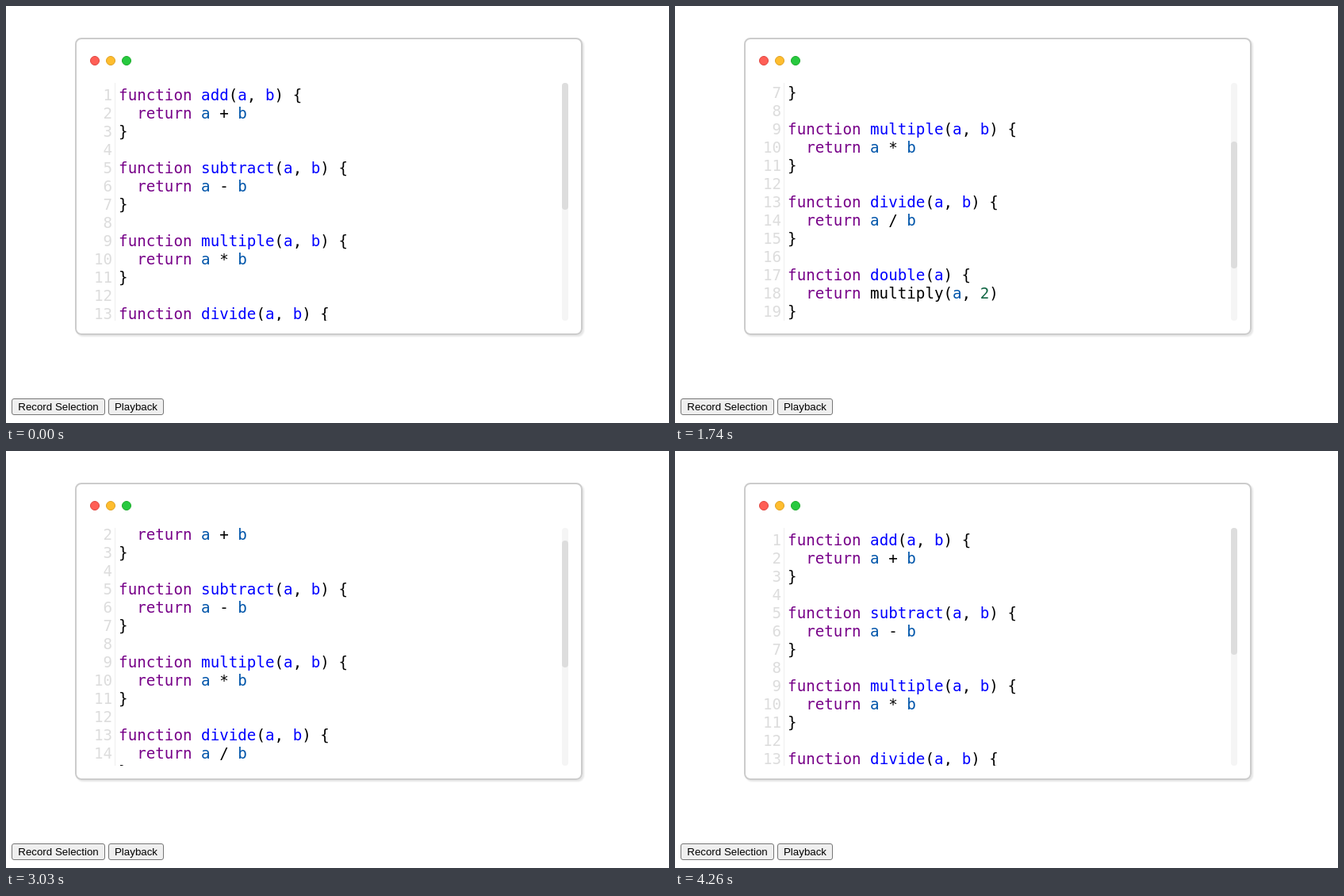
An HTML page for the animation above (4.92 s loop, 836 px wide and 526 px high).

```html
<!DOCTYPE html>
<html lang="en">
<head>
<meta charset="utf-8">
<title>Scroll playback</title>
<style>
  html, body { margin: 0; width: 100%; height: 100%; overflow: hidden; background: #fff; }
  div, button, svg { position: absolute; box-sizing: border-box; }
  .window {
    left: 87px; top: 40px; width: 640px; height: 375px;
    border: 2px solid #ccc; border-radius: 8px; box-shadow: 2px 2px 2px rgba(0, 0, 0, .1);
  }
  .dot { top: 63px; width: 12px; height: 12px; border: 1px solid; border-radius: 50%; }
  .view { left: 106px; top: 97px; width: 595px; height: 300px; overflow: hidden; }
  .gutter { left: 31px; top: 0; width: 1px; height: 300px; background: #eee; }
  #code {
    left: 0; top: 4px; width: 595px;
    font: 19.2px/23px "DejaVu Sans Mono", monospace; white-space: pre;
  }
  #code div { left: 36.1px; height: 23px; }
  #code .num { left: 0; width: 28.1px; text-align: right; color: #ddd; }
  .keyword { color: #708; }
  .def { color: #00f; }
  .local { color: #05a; }
  .number { color: #164; }
  .track { left: 701px; top: 97px; width: 8px; height: 300px; border-radius: 4px; background: #f5f5f5; }
  #thumb { width: 8px; height: 160px; border-radius: 4px; background: #ddd; }
  button {
    top: 495px; height: 21px; padding: 0; border: 1px solid #767676; border-radius: 3px;
    background: #efefef; color: #000; font: 13.333px/19px "Liberation Sans", Arial, sans-serif;
    white-space: nowrap; pointer-events: none;
  }
  button.hover { background: #e5e5e5; border-color: #4f4f4f; }
  #cursor { left: 0; top: 0; overflow: visible; }
</style>
</head>
<body>
<div class="window"></div>
<div class="dot" style="left:106px; background:#ff5f56; border-color:#e0443e"></div>
<div class="dot" style="left:126px; background:#ffbd2e; border-color:#dea123"></div>
<div class="dot" style="left:146px; background:#27c93f; border-color:#1aab29"></div>
<div class="view"><div class="gutter"></div><div id="code"></div></div>
<div class="track"><div id="thumb"></div></div>
<button style="left:7px; width:118px">Record Selection</button>
<button id="play" style="left:129px; width:70px">Playback</button>
<svg id="cursor" width="13" height="20">
  <path d="M.5 .5V16.5L4.2 13L6.8 19L9.4 17.9L6.8 12H12Z" fill="#fff" stroke="#000"/>
</svg>
<script>
const LOOP = 4920;
const $ = id => document.getElementById(id);
const code = $('code'), thumb = $('thumb'), play = $('play'), cursor = $('cursor');

const span = (kind, text) => `<span class="${kind}">${text}</span>`;
const locals = text => text.replace(/\b[ab]\b/g, v => span('local', v))
  .replace(/\b\d\b/g, n => span('number', n));

function block(name, args, body) {
  const params = args.split(', ').map(a => span('def', a)).join(', ');
  return [
    `${span('keyword', 'function')} ${span('def', name)}(${params}) {`,
    `  ${span('keyword', 'return')} ${locals(body)}`,
    '}',
    ''
  ];
}

const lines = [
  block('add', 'a, b', 'a + b'),
  block('subtract', 'a, b', 'a - b'),
  block('multiple', 'a, b', 'a * b'),
  block('divide', 'a, b', 'a / b'),
  block('double', 'a', 'multiply(a, 2)'),
  block('triple', 'a', 'multiply(a, 3)')
].flat();

code.innerHTML = lines.map((line, i) => {
  const top = `style="top:${i * 23}px"`;
  return `<div class="num" ${top}>${i + 1}</div><div ${top}>${line}</div>`;
}).join('');

// Each entry holds until the next: [ms, scroll offset]
const scrolls = [
  [0, 0],
  [1310, 33], [1400, 66], [1510, 96], [1620, 120], [1740, 141],
  [1860, 153], [1970, 162], [2080, 168], [2190, 171], [2310, 174],
  [2490, 150], [2600, 123], [2700, 99], [2800, 75], [2910, 51],
  [3030, 30], [3110, 18], [3220, 9], [3320, 3], [3430, 0],
  [3740, 51], [3860, 105], [3940, 129], [4060, 138], [4260, 0]
];
const exits = [[1400, 330, 506], [1510, 560, 514], [1620, 790, 520]];
const held = (keys, t) => keys.filter(k => k[0] <= t).pop();

function pointer(t) {
  if (t < 290 || t >= 1740) return null;
  if (t >= 1400) return held(exits, t).slice(1);
  const p = Math.min(1, Math.floor((t - 290) / 30) / 14);
  const left = (1 - p) ** 2;
  return [157 + 11 * left, 498 + 24 * left];
}

function draw(now) {
  const t = now % LOOP;
  const scroll = held(scrolls, t)[1];
  code.style.transform = `translateY(${-scroll}px)`;
  thumb.style.top = Math.round(scroll * .527) + 'px';

  const at = pointer(t);
  cursor.style.display = at ? '' : 'none';
  if (at) cursor.style.transform = `translate(${at.map(v => Math.round(v) + 'px')})`;
  play.className = at && at[0] < 199 && at[1] < 516 ? 'hover' : '';
}

const start = performance.now();
function tick() {
  draw(performance.now() - start);
  requestAnimationFrame(tick);
}
tick();
</script>
</body>
</html>
```
